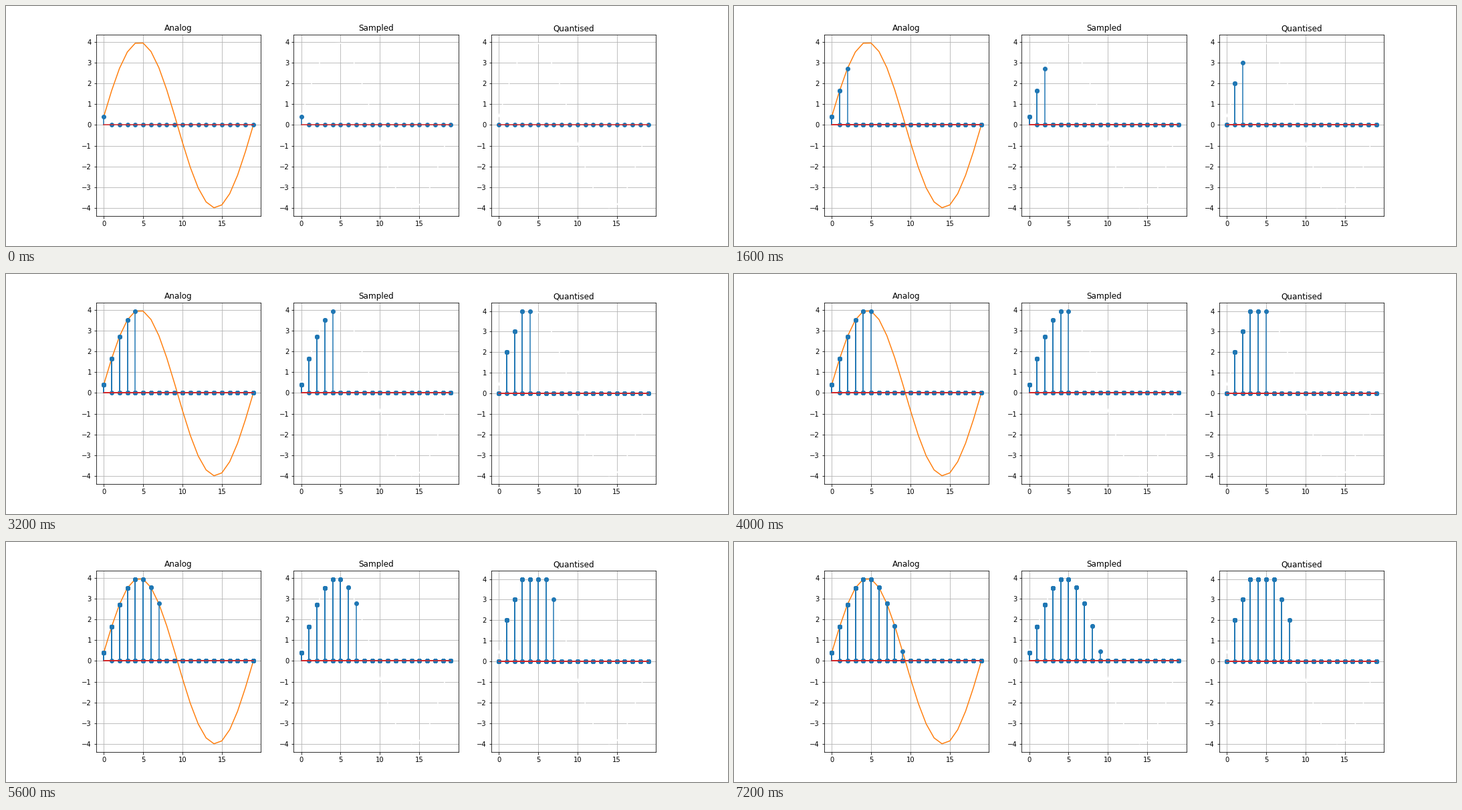
A matplotlib script that plays this animation: 1080x360 px, repeating every 8 s.

```python
import numpy as np
import matplotlib.pyplot as plt
from matplotlib.animation import FuncAnimation

plt.rcParams["font.family"] = "DejaVu Sans"

FRAMES = 10
INTERVAL = 800

n = np.arange(20)
signal = 4 * np.sin(np.linspace(0.1, 2 * np.pi, n.size))

# title, curve colour, stem heights
PANELS = [
    ("Analog", "tab:orange", signal),
    ("Sampled", "white", signal),
    ("Quantised", "white", np.round(signal)),
]

fig, axes = plt.subplots(1, 3, figsize=(15, 5), dpi=72)
fig.subplots_adjust(bottom=0.125)


def add_stems(ax, heights):
    """Layer one full stem plot over whatever the axes already hold."""
    for x in np.flatnonzero(heights):
        ax.plot([x, x], [0, heights[x]], "C0-")
    ax.plot(n, heights, "C0o")
    ax.plot([n[0], n[-1]], [0, 0], "C3-")


def draw(frame):
    for ax, (title, color, values) in zip(axes, PANELS):
        ax.clear()
        ax.set_title(title)
        ax.grid(True)
        ax.plot(n, signal, color=color)
        # Every step stacks another stem plot with one more sample filled in.
        for step in range(frame + 1):
            add_stems(ax, np.where(n <= step, values, 0))
        ax.set_xticks(range(0, 20, 5))
        ax.set_yticks(range(-4, 5))
    return []


anim = FuncAnimation(fig, draw, frames=FRAMES, interval=INTERVAL,
                     init_func=lambda: draw(0), repeat=True, repeat_delay=0)
plt.show()
```
